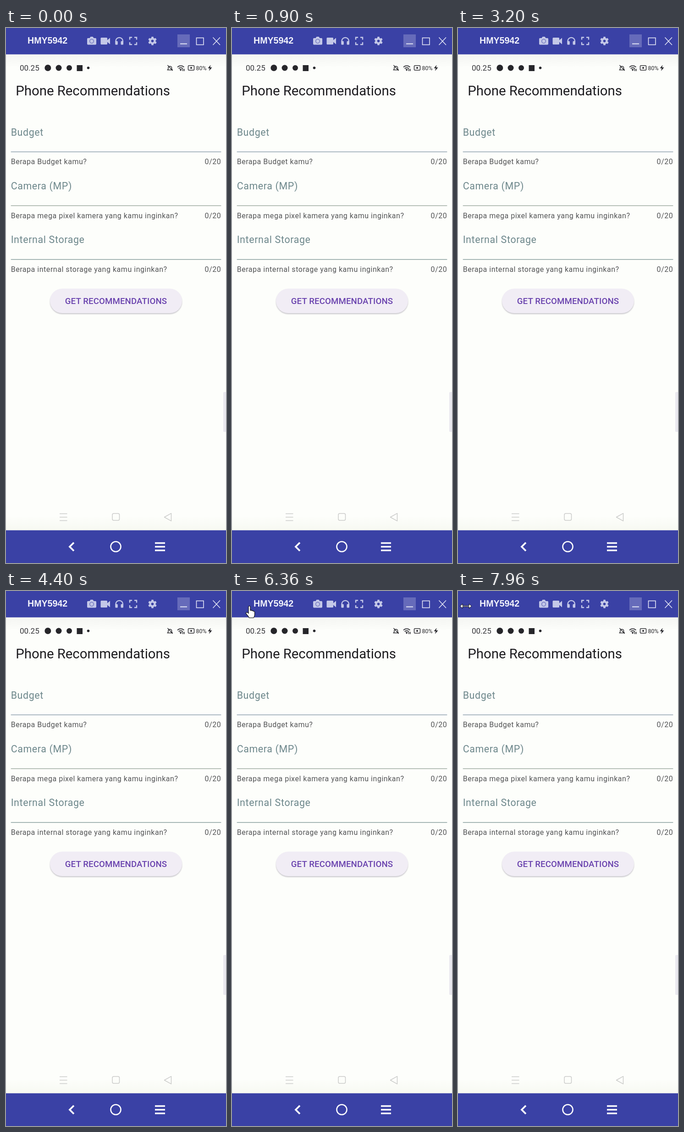
Recreate the animation shown at these times as an HTML page. Size 480 px wide and 1167 px high, loop 8000 ms.

```html
<!DOCTYPE html>
<html lang="id">
<head>
<meta charset="utf-8">
<title>Phone Recommendations</title>
<style>
  html, body { margin: 0; width: 100%; height: 100%; overflow: hidden; background: #fdfefb; }
  svg { display: block; width: 480px; height: 1167px; }
  text { font-family: Roboto, sans-serif; white-space: pre; }
  .device { font: bold 19.6px "Liberation Sans", Arial, sans-serif; fill: #f1f2fb; }
  .title { font-size: 29.33px; fill: #1d1c20; }
  .label { font-size: 21.33px; letter-spacing: .667px; fill: #6d878b; }
  .hint { font-size: 16px; letter-spacing: .533px; fill: #535456; }
  .cta { font-size: 18.67px; font-weight: 500; letter-spacing: .133px; fill: #6a43ae; }
  .line { fill: none; stroke-linecap: butt; }
  .end { text-anchor: end; }
  .mid { text-anchor: middle; }
</style>
</head>
<body>
<svg viewBox="0 0 480 1167" xmlns="http://www.w3.org/2000/svg">
  <defs>
    <linearGradient id="fade" x2="0" y2="1">
      <stop offset="0" stop-color="#f4f5f2"/>
      <stop offset="1" stop-color="#fdfefb"/>
    </linearGradient>
    <linearGradient id="rise" x2="0" y2="1">
      <stop offset="0" stop-color="#fdfefb"/>
      <stop offset="1" stop-color="#f7f9f2"/>
    </linearGradient>
    <filter id="soft" x="-10%" y="-30%" width="120%" height="160%">
      <feGaussianBlur stdDeviation="1.2"/>
    </filter>
  </defs>

  <rect width="480" height="1167" fill="#fdfefb"/>
  <rect y="57" width="480" height="30" fill="url(#fade)"/>
  <rect y="1064" width="480" height="32" fill="url(#rise)"/>

  <!-- window bar -->
  <rect width="480" height="57.500" fill="#3a41a5"/>
  <rect id="hover" x="24" y="1" width="136" height="55" rx="5" fill="#454bad" opacity="0"/>
  <text class="device" x="47" y="34">HMY5942</text>
  <g fill="#c4c8e8">
    <path d="M179 22h3.500l2-3h5l2 3h3.500q2 0 2 2v10.500q0 2-2 2h-16q-2 0-2-2v-10.500q0-2 2-2z"/>
    <circle cx="187" cy="28.700" r="4.300" fill="none" stroke="#7a80c3" stroke-width="1.700"/>
    <path d="M208 21h11.500q1.500 0 1.500 1.500v4l6-5v14l-6-5v4q0 1.500-1.500 1.500h-11.500q-1.500 0-1.500-1.500v-12q0-1.500 1.500-1.500z"/>
    <path class="line" d="M239.500 31v-2.500a7.700 7.700 0 0 1 15.400 0v2.500" stroke="#c4c8e8" stroke-width="2.300"/>
    <rect x="238.300" y="28.500" width="5.500" height="8" rx="1.600"/>
    <rect x="250.500" y="28.500" width="5.500" height="8" rx="1.600"/>
    <path class="line" d="M270 25.500v-5h5M280 20.500h5v5M285 31v5h-5M275 36h-5v-5" stroke="#c4c8e8" stroke-width="2.400"/>
    <g id="gear" transform="translate(319.500 28.300)">
      <circle r="5" fill="none" stroke="#c4c8e8" stroke-width="4.200"/>
    </g>
  </g>
  <rect x="374" y="14" width="27" height="28" fill="#666bba"/>
  <g class="line" stroke="#e3e5f5" stroke-width="1.600">
    <path d="M380 34.500h15" stroke-width="2"/>
    <rect x="415.500" y="21.500" width="15.500" height="15"/>
    <path d="M451.500 20.500l15.500 16.500M467 20.500l-15.500 16.500"/>
  </g>

  <!-- status bar -->
  <text x="30" y="93" font-size="17" fill="#343438">00.25</text>
  <g fill="#26262a">
    <circle cx="91.300" cy="87" r="7"/>
    <circle cx="115" cy="87" r="6.500"/>
    <circle cx="138" cy="87" r="6"/>
    <rect x="154.500" y="81" width="12.500" height="13"/>
    <circle cx="179.500" cy="87" r="2.800"/>
  </g>
  <g class="line" stroke="#303034" stroke-width="1.500">
    <path d="M352.500 91.500h10.500l-1.500-2.500v-3a4 4 0 0 0-7.500 0v3zM352.500 81l11 12"/>
    <path d="M374 85.500a10 10 0 0 1 14.500 0M376.700 88.500a6.500 6.500 0 0 1 9 0" stroke-width="1.800"/>
    <rect x="397.500" y="82" width="13" height="10" rx="1.500"/>
  </g>
  <g fill="#26262a">
    <path d="M378.500 90.500q2.700-2 5.400 0l-2.700 3.200z"/>
    <path d="M385 89h1.500v5h-1.500zM388 89h1.500v5h-1.500z"/>
    <circle cx="404" cy="87" r="2"/>
    <path d="M446.500 80.500l-6 7.300h4l-1.500 6 6.500-7.800h-4.200z"/>
    <text x="414.500" y="91.500" font-size="12.500">80%</text>
  </g>

  <text class="title" x="21.330" y="146.700">Phone Recommendations</text>
  <g id="fields"></g>

  <rect x="96" y="571" width="288" height="53" rx="26.500" fill="#c9c7cc" filter="url(#soft)"/>
  <rect x="96" y="568.500" width="288" height="53.500" rx="26.700" fill="#f1edf5"/>
  <text class="cta mid" x="240" y="602.200">GET RECOMMENDATIONS</text>

  <rect x="474" y="794" width="9" height="87" rx="2" fill="#eae9ef"/>

  <!-- phone keys -->
  <g class="line" stroke="#cbccca" stroke-width="1.500">
    <path d="M117 1059.500h16.500M117 1067h16.500M117 1074.500h16.500"/>
    <rect x="232" y="1059" width="15.500" height="15" rx="3"/>
    <path d="M345.500 1067l15-8.300v16.600z" stroke-linejoin="round"/>
  </g>

  <!-- bottom bar -->
  <rect y="1095.600" width="480" height="72" fill="#3a41a5"/>
  <g class="line" stroke="#fbfbff">
    <path d="M148 1122.500l-9 9 9 9" stroke-width="3.800"/>
    <circle cx="239.500" cy="1131.300" r="11" stroke-width="2.600"/>
    <path d="M325 1123.500h22M325 1131.500h22M325 1139.500h22" stroke-width="3.600"/>
  </g>

  <g id="pointer" fill="#fff" stroke="#111" stroke-width="1.200" stroke-linejoin="round">
    <path id="hand" d="M-2 1q2-2.500 4 0v8.500q2.500-1.500 3.500.8 2.500-1 3.300 1 2.700-.5 2.700 2v5q0 4-2.500 7.200h-9.500q-2.500-4.500-6-8-2-3 .5-3.800 2-.5 4 2.200z"/>
    <path id="arrow" d="M0 0v19l4.500-4.200 3.300 7.500 3.400-1.500-3.300-7.300h6.300z"/>
    <path id="resize" stroke-width="1" d="M-12.500 0l5.500-5v4h14v-4l5.500 5-5.500 5v-4h-14v4z"/>
  </g>
</svg>
<script>
const LOOP = 8000;
const $ = id => document.getElementById(id);

const rows = [
  ["Budget", "Berapa Budget kamu?", "#8a9dab"],
  ["Camera (MP)", "Berapa mega pixel kamera yang kamu inginkan?", "#98a69b"],
  ["Internal Storage", "Berapa internal storage yang kamu inginkan?", "#83999a"]
];
$("fields").innerHTML = rows.map(([label, hint, color], i) => `
  <g transform="translate(0 ${i * 117.33})">
    <text class="label" x="10.67" y="234.7">${label}</text>
    <rect x="10.67" y="269.5" width="458.67" height="1.4" fill="${color}"/>
    <text class="hint" x="10.67" y="297.3">${hint}</text>
    <text class="hint end" x="469.33" y="297.3">0/20</text>
  </g>`).join("");

for (let a = 0; a < 360; a += 60) {
  $("gear").insertAdjacentHTML("beforeend",
    `<rect x="-2.3" y="-9.3" width="4.6" height="4" rx=".8" transform="rotate(${a})"/>`);
}

// time, x, y, cursor shape
const path = [
  [6230, 44, -27, "hand"],
  [6300, 40, 12, "hand"],
  [6360, 38, 33, "hand"],
  [6560, 31, 32, "hand"],
  [6660, 23, 30, "arrow"],
  [6760, 18.5, 29, "arrow"],
  [7360, 18.5, 29, "arrow"],
  [7500, 13, 31, "resize"],
  [7700, 14, 33, "resize"],
  [7960, 17, 33, "resize"],
  [LOOP, 17, 33, "resize"]
];
// time, opacity of the title highlight
const glow = [[0, 0], [6420, 0], [6540, 1], [7000, 1], [7130, 0], [LOOP, 0]];

function sample(keys, t, col) {
  let i = 0;
  while (i < keys.length - 2 && t >= keys[i + 1][0]) i++;
  const a = keys[i], b = keys[i + 1];
  const k = Math.min(1, Math.max(0, (t - a[0]) / (b[0] - a[0])));
  return a[col] + (b[col] - a[col]) * k;
}

function draw(t) {
  $("hover").setAttribute("opacity", sample(glow, t, 1));
  const now = path.filter(key => key[0] <= t).pop();
  $("pointer").style.display = now ? "" : "none";
  if (now) {
    $("pointer").setAttribute("transform",
      `translate(${sample(path, t, 1)} ${sample(path, t, 2)})`);
    for (const id of ["hand", "arrow", "resize"]) {
      $(id).style.display = id === now[3] ? "" : "none";
    }
  }
}

const start = performance.now();
function tick() {
  draw((performance.now() - start) % LOOP);
  requestAnimationFrame(tick);
}
tick();
</script>
</body>
</html>
```
